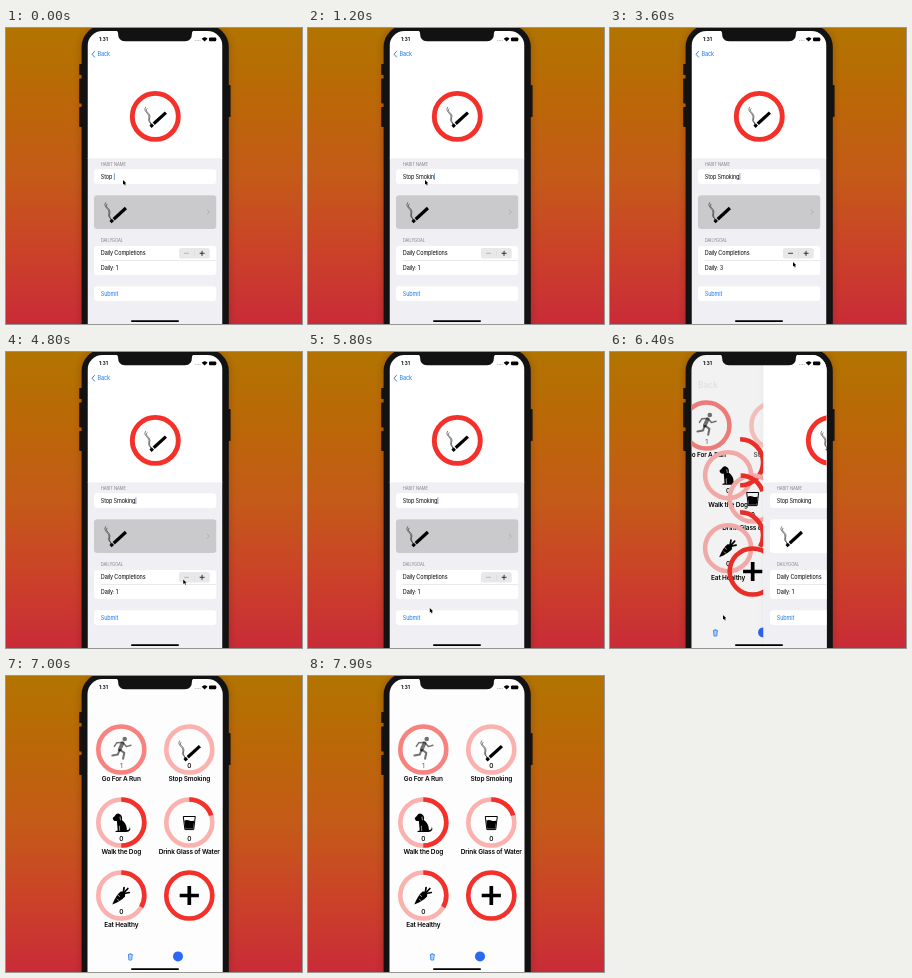
An HTML page with a canvas that plays this animation: 296x296 px, repeating every 8000 ms.

```html
<!DOCTYPE html>
<html lang="en">
<head>
<meta charset="utf-8">
<title>Habit tracker</title>
<style>
html, body { margin: 0; width: 100%; height: 100%; overflow: hidden; background: #c65a1a; }
canvas { display: block; width: 296px; height: 296px; }
</style>
</head>
<body>
<canvas id="stage"></canvas>
<script>
const SIZE = 296, LOOP = 8000;
const RED = '#f3302a', BLUE = '#1673ea', GRAY = '#efeff4';
const FONT = 'Inter, Roboto, "Liberation Sans", sans-serif';
const SCREEN = { x: 81.5, y: 3, w: 135, h: 312 };
const LEFT = 115.3, RIGHT = 183.3, ROWS = [73.5, 146.5, 219.5];

const canvas = document.getElementById('stage');
const dpr = window.devicePixelRatio || 1;
canvas.width = canvas.height = Math.round(SIZE * dpr);
const c = canvas.getContext('2d');

const clamp = v => Math.max(0, Math.min(1, v));
const lerp = (a, b, k) => a + (b - a) * k;
const ease = v => { v = clamp(v); return v * v * (3 - 2 * v); };
const spring = s => s <= 0 ? 0 : 1 - (1 + s) * Math.exp(-s);

function box(x, y, w, h, r, color) {
  c.fillStyle = color;
  c.beginPath();
  c.roundRect(x, y, w, h, r);
  c.fill();
}

function dot(x, y, r, color) {
  c.fillStyle = color;
  c.beginPath();
  c.arc(x, y, r, 0, 7);
  c.fill();
}

function line(points, width, color = '#000') {
  c.strokeStyle = color;
  c.lineWidth = width;
  c.beginPath();
  for (let i = 0; i < points.length; i += 2) c.lineTo(points[i], points[i + 1]);
  c.stroke();
}

function ring(x, y, part, width, color) {
  c.strokeStyle = color;
  c.lineWidth = width;
  c.lineCap = 'butt';
  c.beginPath();
  c.arc(x, y, 23, -Math.PI / 2, -Math.PI / 2 + part * Math.PI * 2);
  c.stroke();
}

function text(s, x, y, size, color = '#000', weight = 400, align = 'left') {
  c.font = `${weight} ${size}px ${FONT}`;
  c.letterSpacing = (-size * 0.025).toFixed(3) + 'px';
  c.textAlign = align;
  c.fillStyle = color;
  c.fillText(s, x, y);
}

function at(x, y, draw) {
  c.save();
  c.translate(x, y);
  draw();
  c.restore();
}

// Icons, each drawn around its own centre
function cigarette() {
  c.lineCap = 'butt';
  line([-1.6, 6.8, 10.6, -4.4], 3.2);
  line([-4.8, 9.7, -2.4, 7.5], 3.2);
  c.strokeStyle = '#222';
  c.lineWidth = 0.6;
  for (const d of [0, 1.5]) {
    c.beginPath();
    c.moveTo(-9.5 + d, -10 + d);
    c.bezierCurveTo(-13 + d, -5, -5 + d, -4, -6.5 + d / 2, 1.5);
    c.bezierCurveTo(-7.5 + d, 5, -5, 4.5, -4, 8);
    c.stroke();
  }
}

function runner() {
  const g = '#000';
  c.lineCap = c.lineJoin = 'round';
  dot(3.4, -9, 2.3, g);
  line([1.2, -4.8, -1.6, 1.6], 3.8, g);
  line([-1.8, 2, -3.4, 6.4, -9, 7.4], 2, g);
  line([-1, 2, 3, 4.8, 1.8, 10.6], 2.1, g);
  line([0.6, -5.4, -4.6, -5.2, -7, -1.6], 1.5, g);
  line([2, -5, 5, -1.4, 9.6, -2.8], 1.5, g);
}

function dog() {
  c.fillStyle = '#000';
  c.beginPath();
  c.moveTo(-8.6, -4.6);
  c.quadraticCurveTo(-6.5, -6, -5.4, -8);
  c.quadraticCurveTo(-3.5, -10, -1, -8);
  c.quadraticCurveTo(1.4, -6, 0.6, -2.6);
  c.quadraticCurveTo(5.6, 1, 5.6, 7.4);
  c.quadraticCurveTo(9, 7.6, 8.4, 3.8);
  c.quadraticCurveTo(10.6, 9, 5, 9.6);
  c.lineTo(-6, 9.6);
  c.quadraticCurveTo(-6, 8, -3.6, 8);
  c.lineTo(-4.4, -1.6);
  c.quadraticCurveTo(-8.4, -1, -8.6, -4.6);
  c.fill();
  c.lineCap = 'round';
  line([-1.4, -5.6, -0.8, -2.6], 0.6, '#fff');
  line([-2, 3.5, -1.6, 8], 0.6, '#fff');
}

function glass() {
  c.lineJoin = 'round';
  line([-6, -6.5, -4.4, 6.6, 4.4, 6.6, 6, -6.5, -6, -6.5], 1);
  c.fillStyle = '#000';
  c.beginPath();
  c.moveTo(-4.9, -2.4);
  c.quadraticCurveTo(-2.4, -3.6, 0, -2.4);
  c.quadraticCurveTo(2.4, -1.4, 4.9, -2.4);
  c.lineTo(4, 5.8);
  c.lineTo(-4, 5.8);
  c.fill();
}

function carrot() {
  c.fillStyle = '#000';
  c.beginPath();
  c.moveTo(-9, 9);
  c.quadraticCurveTo(-5, -1, -0.6, -4);
  c.quadraticCurveTo(4.6, -4.4, 3.8, 1);
  c.quadraticCurveTo(0, 5.4, -9, 9);
  c.fill();
  c.lineCap = 'round';
  line([2, -3, 2.8, -8], 1.7);
  line([2.5, -2.6, 6.6, -7], 1.7);
  line([3, -2, 8, -3], 1.7);
  line([-3.4, -0.4, -1.6, 1], 0.6, '#fff');
  line([-2.6, 5, -4, 3.6], 0.6, '#fff');
}

function plus() {
  c.lineCap = 'butt';
  line([-9.6, 0, 9.6, 0], 3.7);
  line([0, -9.6, 0, 9.6], 3.7);
}

// from/to are [x, y]; the red part of a ring trails the rest slightly
const habits = [
  { name: 'Go For A Run', icon: runner, dy: -1.5, count: 1, part: 1, done: true, from: [LEFT, ROWS[0]], to: [LEFT, ROWS[0]] },
  { name: 'Stop Smoking', icon: cigarette, dy: 1, count: 0, part: 0, added: true, from: [RIGHT, ROWS[0]], to: [RIGHT, ROWS[0]] },
  { name: 'Walk the Dog', icon: dog, dy: 0, count: 0, part: 0.5, from: [RIGHT, ROWS[0]], to: [LEFT, ROWS[1]] },
  { name: 'Drink Glass of Water', icon: glass, dy: 0.5, count: 0, part: 0.2, from: [LEFT, ROWS[1]], to: [RIGHT, ROWS[1]] },
  { name: 'Eat Healthy', icon: carrot, dy: 0, count: 0, part: 1 / 3, from: [RIGHT, ROWS[1]], to: [LEFT, ROWS[2]] },
  { icon: plus, dy: 0, from: [LEFT, ROWS[2]], to: [RIGHT, ROWS[2]] }
];

function drawHabit(h, move, trail) {
  const x = lerp(h.from[0], h.to[0], move), y = lerp(h.from[1], h.to[1], move);
  const base = h.added ? move : 1;
  c.globalAlpha = base;
  if (!h.name) {
    ring(x, y, 1, 4.6, RED);
    at(x, y, plus);
    return;
  }
  ring(x, y, 1, 4.6, h.done ? '#f7827e' : '#fbb1ae');
  if (h.part && !h.done) {
    ring(lerp(h.from[0], h.to[0], trail), lerp(h.from[1], h.to[1], trail), h.part, 4.6, RED);
  }
  c.globalAlpha = base * (h.done ? 0.55 : 1);
  at(x, y + h.dy, h.icon);
  text(h.count, x, y + 18.2, 6.5, '#000', 500, 'center');
  c.globalAlpha = base;
  text(h.name, x, y + 31.6, 6.5, '#000', 600, 'center');
  c.globalAlpha = 1;
}

function drawList(t, pop) {
  c.fillStyle = '#fdfdfd';
  c.fillRect(SCREEN.x - 45, 0, 200, SIZE);
  const move = ease((t - 6183) / 350), trail = ease((t - 6225) / 350);
  for (const h of habits) drawHabit(h, move, trail);
  c.lineCap = 'round';
  line([122, 278.8, 126.6, 278.8], 0.7, BLUE);
  line([123.4, 278.4, 123.6, 277.6, 125, 277.6, 125.2, 278.4], 0.6, BLUE);
  line([122.5, 279, 122.9, 284, 125.7, 284, 126.1, 279], 0.8, BLUE);
  line([123.7, 280.2, 123.8, 282.8], 0.4, BLUE);
  line([124.9, 280.2, 124.8, 282.8], 0.4, BLUE);
  dot(172, 280.4, 5, '#2c69f2');
  c.globalAlpha = 0.25 * (1 - pop);
  text('Back', 107, 36, 8.5, '#666', 600);
  c.globalAlpha = 1;
}

const TITLE = 'Stop Smoking';

function drawForm(t, pop) {
  c.fillStyle = '#fff';
  c.fillRect(SCREEN.x, 0, SCREEN.w, 131);
  c.fillStyle = GRAY;
  c.fillRect(SCREEN.x, 130.3, SCREEN.w, 170);

  c.globalAlpha = clamp(1 - pop * 2.5);
  c.lineCap = c.lineJoin = 'round';
  line([88.6, 23.3, 86, 26.2, 88.6, 29.1], 0.9, BLUE);
  text('Back', 91.6, 28.2, 5.5, BLUE);
  c.globalAlpha = 1;

  ring(149.3, 88.4, 1, 4.9, RED);
  at(149.3, 89, cigarette);

  text('HABIT NAME', 94.8, 137.7, 4.2, '#85858a');
  box(88, 141.3, 122.3, 14.8, 3, '#fff');
  const typed = TITLE.slice(0, 5 + Math.floor(clamp((t - 30) / 1190) * 7));
  text(typed, 94.8, 150.8, 5.5);
  const caretX = 94.8 + c.measureText(typed).width + 0.3;
  const blink = t < 1500 || (t % 1000 > 330 && t % 1000 < 830);
  if (blink && pop < 0.1) box(caretX, 145.3, 0.7, 6.8, 0, '#3d6fd8');

  box(88, 167.3, 122.3, 33.7, 3, '#fff');
  c.globalAlpha = clamp((6390 - t) / 100);
  box(88, 167.3, 122.3, 33.7, 3, '#cacacd');
  c.globalAlpha = 1;
  at(109.3, 184.4, cigarette);
  c.lineCap = c.lineJoin = 'round';
  line([201.4, 182.2, 203.2, 184.2, 201.4, 186.2], 0.7, '#a0a0a5');

  let goal = 1;
  for (const [time, step] of [[2900, 1], [3200, 1], [4150, -1], [4550, -1]]) {
    if (t >= time) goal += step;
  }
  text('DAILYGOAL', 94.8, 214, 4.2, '#85858a');
  box(88, 218, 122.3, 29, 3, '#fff');
  box(94.8, 232.3, 115.5, 0.4, 0, '#d4d4d8');
  text('Daily Completions', 94.8, 227.3, 5.5);
  text('Daily: ' + goal, 94.8, 241.7, 5.5);
  box(173, 220, 30.8, 10.6, 2.6, '#e8e8ea');
  box(188.2, 222.6, 0.4, 5.4, 0, '#cfcfd3');
  c.lineCap = 'round';
  line([178.4, 225.3, 182.6, 225.3], 0.8, goal > 1 ? '#111' : '#a9a9ad');
  line([193.8, 225.3, 198.2, 225.3], 0.8, '#111');
  line([196, 223.1, 196, 227.5], 0.8, '#111');

  const pressed = t > 6150 && t < 6290;
  box(88, 258.2, 122.3, 14.8, 3, pressed ? '#d1d1d6' : '#fff');
  text('Submit', 94.8, 267.6, 5.5, BLUE);
}

const PATH = [
  [0, 117, 152], [1500, 117, 152], [2300, 176, 219], [2430, 176, 219],
  [2750, 196, 226], [3250, 196, 226], [3600, 183, 234], [3950, 180, 226],
  [4650, 180, 226], [5800, 121.8, 256], [6100, 112, 263], [6420, 113, 263],
  [6600, 185.5, 190], [6850, 224, 152], [8000, 224, 152]
];

function drawCursor(t) {
  let i = 1;
  while (i < PATH.length - 1 && PATH[i][0] < t) i++;
  const [t0, x0, y0] = PATH[i - 1], [t1, x1, y1] = PATH[i];
  const k = ease((t - t0) / (t1 - t0));
  at(lerp(x0, x1, k), lerp(y0, y1, k), () => {
    c.beginPath();
    for (const [x, y] of [[0, 0], [0, 4.6], [1.1, 3.7], [1.9, 5.4], [2.7, 5], [1.9, 3.4], [3.3, 3.3]]) c.lineTo(x, y);
    c.closePath();
    c.lineJoin = 'round';
    c.strokeStyle = '#fff';
    c.lineWidth = 0.7;
    c.stroke();
    c.fillStyle = '#000';
    c.fill();
  });
}

function drawBackdrop() {
  const g = c.createLinearGradient(0, 0, 0, SIZE);
  ['#b27400', '#bb6708', '#c45a18', '#cb4228', '#c92b37'].forEach((col, i) => g.addColorStop(i / 4, col));
  c.fillStyle = g;
  c.fillRect(0, 0, SIZE, SIZE);
}

function drawBody() {
  for (const [x, y, h] of [[73.2, 36, 11], [73.2, 50.5, 25], [73.2, 79, 20], [221, 57, 32]]) {
    box(x, y, 3.6, h, 0.8, '#15130f');
  }
  c.save();
  c.shadowColor = 'rgba(60,10,0,.28)';
  c.shadowBlur = 9 * dpr;
  box(75.6, -3, 147.2, 330, 22, '#121213');
  c.restore();
}

function drawStatus() {
  c.fillStyle = '#121213';
  c.beginPath();
  c.moveTo(109, 2);
  c.quadraticCurveTo(112, 3, 112, 5);
  c.quadraticCurveTo(112, 13.2, 119, 13.2);
  c.lineTo(179, 13.2);
  c.quadraticCurveTo(186, 13.2, 186, 5);
  c.quadraticCurveTo(186, 3, 189, 2);
  c.fill();
  text('1:31', 93, 13.2, 5.2, '#000', 600);
  for (let i = 0; i < 4; i++) dot(189.6 + i * 1.5, 12.4, 0.45, '#777');
  c.fillStyle = '#000';
  c.beginPath();
  c.moveTo(198.6, 13.4);
  c.arc(198.6, 13.4, 4, -Math.PI * 0.76, -Math.PI * 0.24);
  c.fill();
  box(203, 9.6, 7.2, 3.6, 1, '#000');
  box(210.5, 10.8, 0.5, 1.3, 0.2, '#666');
  box(125, 292.2, 48, 1.7, 0.85, '#000');
}

function draw(t) {
  c.setTransform(dpr, 0, 0, dpr, 0, 0);
  c.globalAlpha = 1;
  drawBackdrop();
  drawBody();

  const pop = t < 7400 ? spring((t - 6292) * 0.0164) : 1;
  c.save();
  c.beginPath();
  c.roundRect(SCREEN.x, SCREEN.y, SCREEN.w, SCREEN.h, 15);
  c.clip();
  if (pop > 0) {
    at(-40.5 * (1 - pop), 0, () => drawList(t, pop));
    c.fillStyle = `rgba(0,0,10,${0.09 * (1 - pop)})`;
    c.fillRect(0, 0, SIZE, SIZE);
  }
  if (pop < 1) {
    at(SCREEN.w * pop, 0, () => {
      if (pop > 0) {
        c.save();
        c.shadowColor = `rgba(0,0,0,${0.2 * (1 - pop)})`;
        c.shadowBlur = 4 * dpr;
        c.fillStyle = '#fff';
        c.fillRect(SCREEN.x, 0, SCREEN.w, SIZE);
        c.restore();
      }
      drawForm(t, pop);
    });
  }
  drawStatus();
  drawCursor(t);
  c.restore();
}

function tick(now) {
  draw(now % LOOP);
  requestAnimationFrame(tick);
}
draw(0);
requestAnimationFrame(tick);
</script>
</body>
</html>
```
